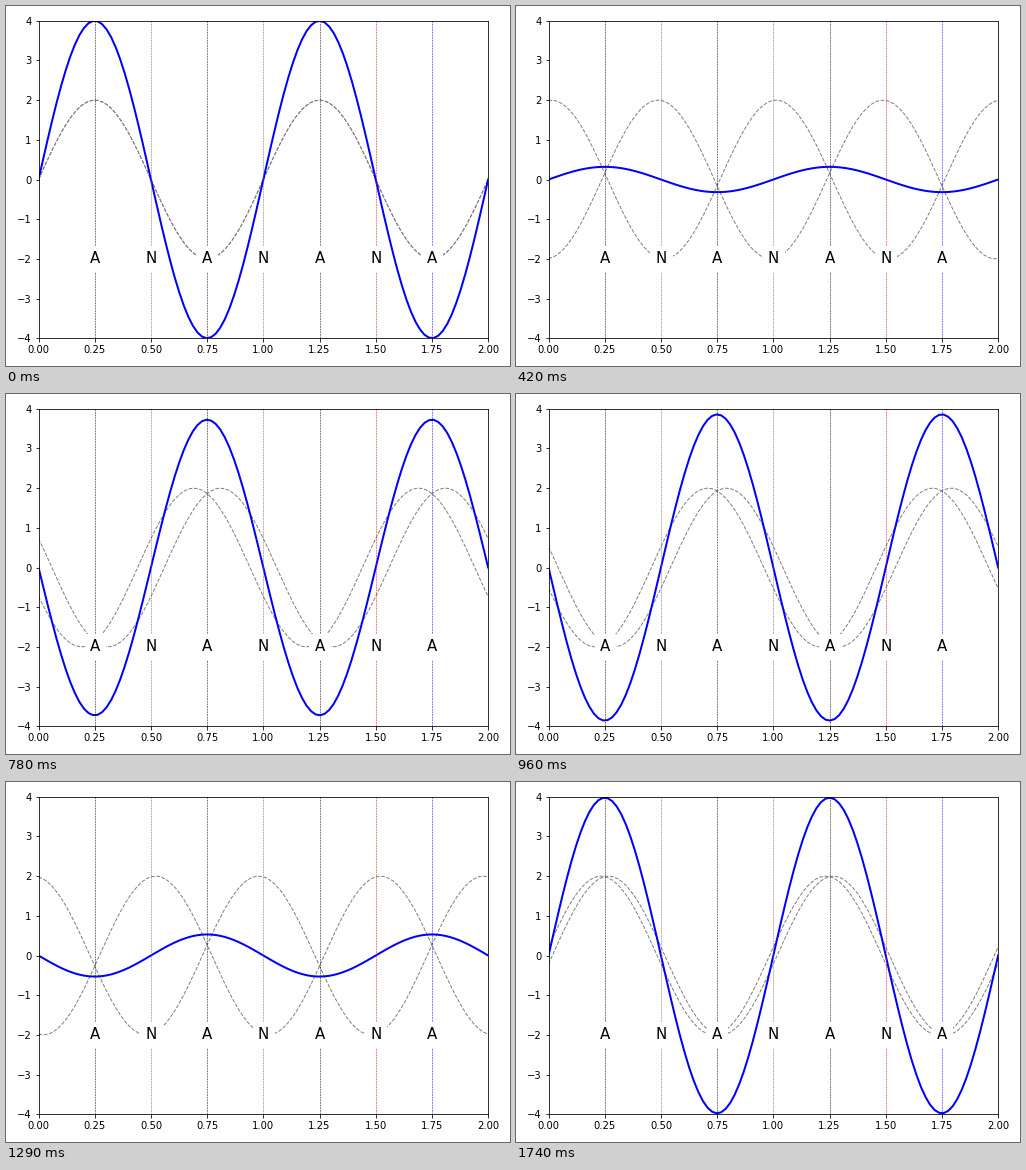
These frames come from a looping animation (504x360 px, 1.77 s). A matplotlib script:

```python
import numpy as np
import matplotlib.pyplot as plt
from matplotlib.animation import FuncAnimation

FRAMES = 59
STEP_MS = 30
AMP = 2

fig, ax = plt.subplots(figsize=(7, 5), dpi=72)
ax.set_xlim(0, 2)
ax.set_ylim(-4, 4)

x = np.linspace(0, 2, 100)
right, = ax.plot([], [], "--", color="gray", lw=1)
left, = ax.plot([], [], "--", color="gray", lw=1)
total, = ax.plot([], [], "b-", lw=2)

# Antinodes (A) and nodes (N) alternate every quarter wavelength
line_colors = ["black", "dimgray", "black", "dimgray", "black", "red", "blue"]
box = dict(boxstyle="square,pad=0.333", fc="white", ec="white", lw=1)
for i, color in enumerate(line_colors):
    pos = 0.25 * (i + 1)
    ax.axvline(pos, ls="--", lw=0.5, color=color)
    ax.text(pos, -2, "AN"[i % 2], size=15, ha="center", va="center", bbox=box)

fig.tight_layout()


def update(frame):
    phase = 2 * np.pi * frame / FRAMES
    y_right = AMP * np.sin(2 * np.pi * x - phase)
    y_left = AMP * np.sin(2 * np.pi * x + phase)
    right.set_data(x, y_right)
    left.set_data(x, y_left)
    total.set_data(x, y_right + y_left)
    return right, left, total


anim = FuncAnimation(fig, update, frames=FRAMES, interval=STEP_MS,
                     repeat=True, repeat_delay=0, blit=False)
plt.show()
```
